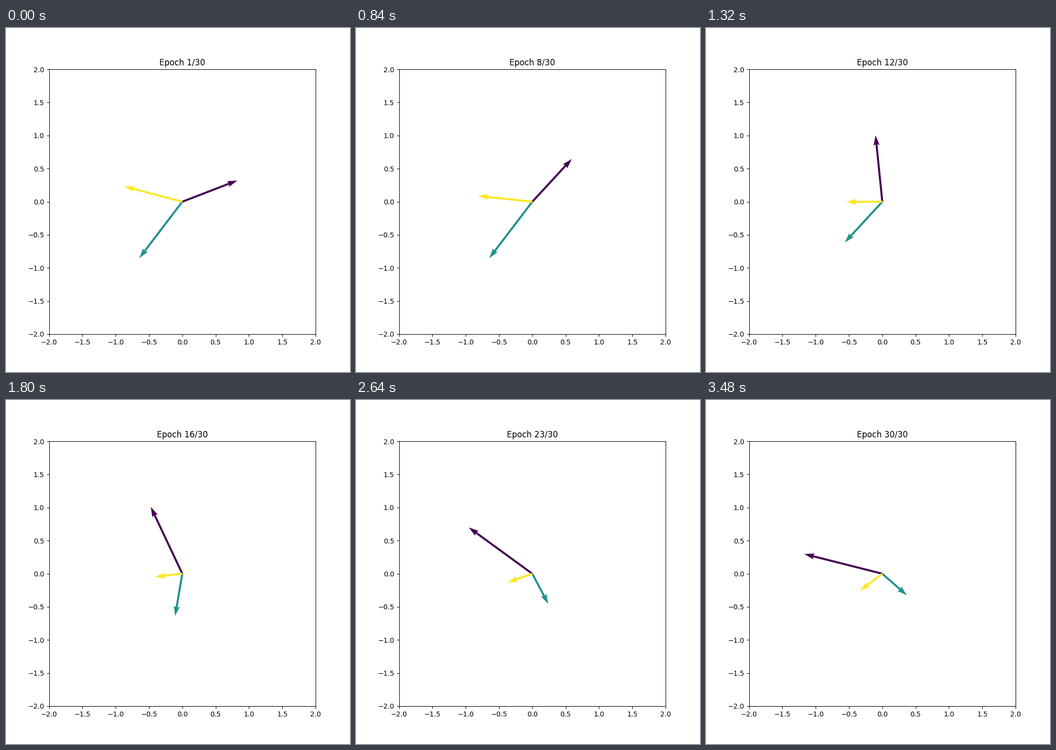
Animation, 700 px wide and 700 px high, one loop 3600 ms. Source, as a matplotlib script:

```python
import numpy as np
import matplotlib.pyplot as plt
from matplotlib.animation import FuncAnimation

EPOCHS = 30
JUMP = 10   # the steady drift ends here and the vectors start to settle
DECAY = 10  # time constant of the settling, in epochs

# Tips as complex numbers: purple, teal, yellow.
START = np.array([0.826 + 0.321j, -0.645 - 0.852j, -0.873 + 0.232j])
DRIFT = np.array([-0.0334 + 0.0463j, 0, 0.0086 - 0.0207j])

SETTLE_AT = np.array([12, 16, 20, 30])
SETTLE = np.array([
    [-0.101 + 1.002j, -0.563 - 0.615j, -0.540 - 0.003j],
    [-0.473 + 1.009j, -0.108 - 0.639j, -0.407 - 0.045j],
    [-0.788 + 0.868j, 0.133 - 0.534j, -0.381 - 0.083j],
    [-1.170 + 0.298j, 0.368 - 0.325j, -0.334 - 0.257j],
])


def powers(epoch):
    """Cubic basis in exponentially slowing time."""
    return np.vander(np.exp(-np.atleast_1d(epoch) / DECAY), 4)


COEFS = np.linalg.solve(powers(SETTLE_AT), SETTLE)


def tips_at(epoch):
    if epoch < JUMP:
        tips = START + (epoch - 1) * DRIFT
    else:
        tips = (powers(epoch) @ COEFS)[0]
    return tips.real, tips.imag


fig, ax = plt.subplots(figsize=(7, 7), dpi=100)
ax.set(xlim=(-2, 2), ylim=(-2, 2))
title = ax.set_title(f"Epoch 1/{EPOCHS}")
origin = np.zeros(3)
arrows = ax.quiver(origin, origin, *tips_at(1), np.arange(3),
                   angles="xy", scale_units="xy", scale=1, cmap="viridis")


def update(frame):
    epoch = frame + 1
    arrows.set_UVC(*tips_at(epoch))
    title.set_text(f"Epoch {epoch}/{EPOCHS}")
    return arrows, title


anim = FuncAnimation(fig, update, frames=EPOCHS, interval=120,
                     repeat=True, repeat_delay=0, blit=False)
plt.show()
```
